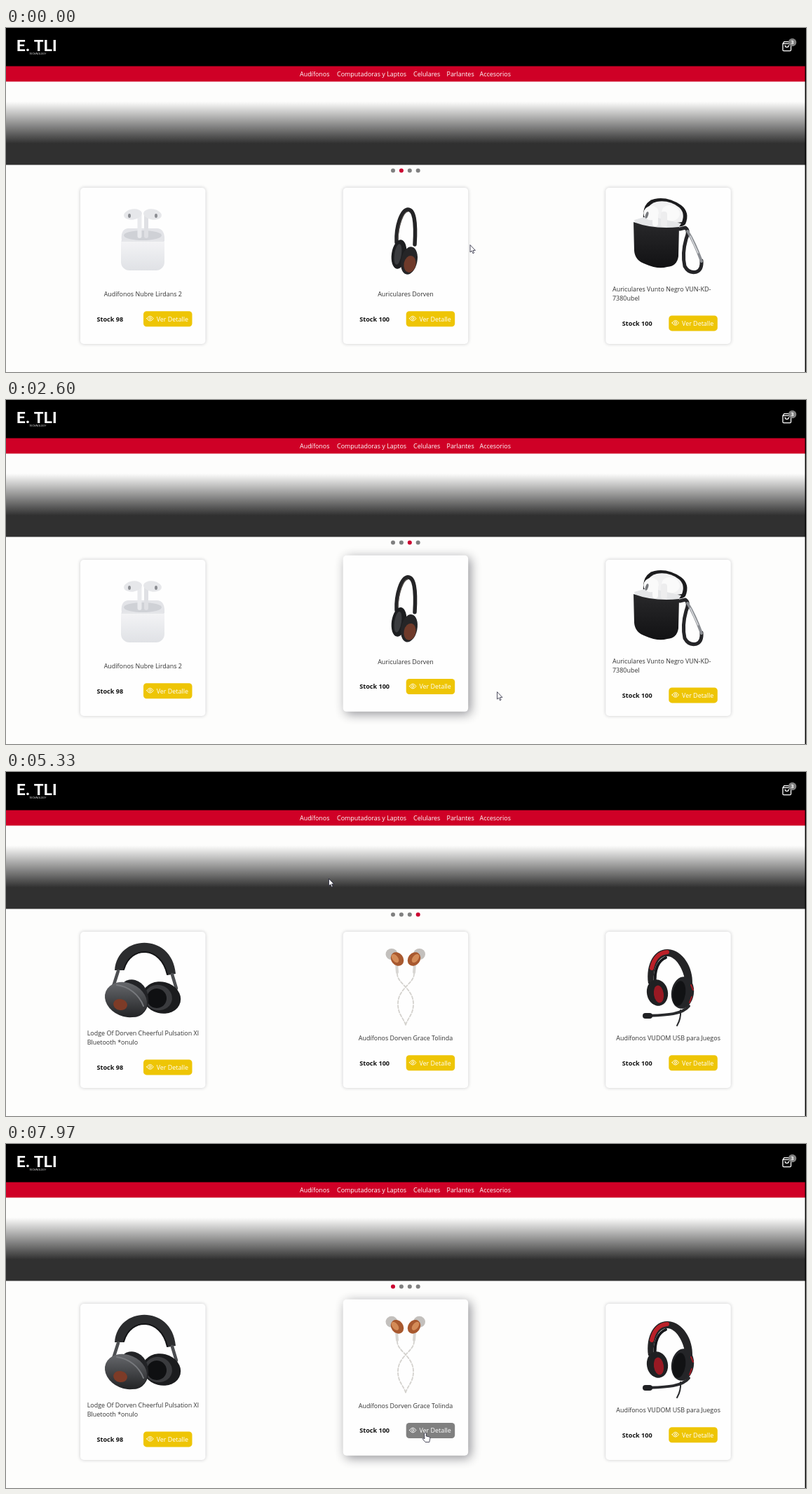
An HTML page with a canvas for the animation above (8000 ms loop, 1141 px wide and 491 px high).

```html
<!DOCTYPE html>
<html lang="es">
<head>
<meta charset="utf-8">
<title>Tienda</title>
<style>
  html, body { margin: 0; width: 100%; height: 100%; overflow: hidden; background: #fdfdfc; }
  canvas { display: block; }
</style>
</head>
<body>
<canvas id="stage" width="1141" height="491"></canvas>
<script>
const ctx = document.getElementById('stage').getContext('2d');
const LOOP = 8000, SWAP = 4800, RAMP = 200;
const SANS = '"Open Sans", "Noto Sans", sans-serif';
const RED = '#cf0026', YELLOW = '#eec505', GRAY = '#808080', PAGE = '#fdfdfc';
const CARD_X = [106, 480.7, 855.3], CARD_W = 178.5, CARD_Y = 228, CARD_H = 223, LIFT = 6.2;

const links = [
  ['Audífonos', 419, 43], ['Computadoras y Laptos', 472, 100], ['Celulares', 581, 38],
  ['Parlantes', 628.5, 38], ['Accesorios', 675.5, 45]
];
const pages = [
  [
    { lines: ['Audífonos Nubre Lirdans 2'], stock: 98, draw: budCase },
    { lines: ['Auriculares Dorven'], stock: 100, draw: slimHeadset },
    { lines: ['Auriculares Vunto Negro VUN-KD-', '7380ubel'], stock: 100, draw: blackCase }
  ],
  [
    { lines: ['Lodge Of Dorven Cheerful Pulsation Xl', 'Bluetooth *onulo'], stock: 98, draw: bigHeadset },
    { lines: ['Audífonos Dorven Grace Tolinda'], stock: 100, draw: earphones },
    { lines: ['Audífonos VUDOM USB para Juegos'], stock: 100, draw: gamingHeadset }
  ]
];
// pointer path: time, x, y
const path = [
  [0, 662, 310], [570, 662, 310], [1400, 227.5, 412], [1900, 227.5, 412],
  [2300, 598, 415], [2480, 602, 416], [2600, 700.5, 417], [2900, 972, 420],
  [3150, 972, 420], [3970, 509, 58.5], [4400, 440, 64], [5130, 440, 64],
  [5330, 460.5, 152.5], [5750, 230, 416], [5930, 230, 416], [6570, 885.5, 340],
  [6850, 978, 412], [7050, 978, 412], [7650, 590, 405], [7850, 598, 412], [8000, 598, 412]
];
// card, hover start, hover end
const hovers = [
  [0, 1150, 2020], [1, 2150, 2590], [2, 2730, 3330],
  [0, 5560, 6030], [1, 6160, 6340], [2, 6560, 7180], [1, 7380, 9000]
];

const ease = k => { k = Math.min(1, Math.max(0, k)); return k * k * (3 - 2 * k); };

function pointerAt(t) {
  const i = Math.max(1, path.findIndex(p => p[0] > t));
  const [t0, x0, y0] = path[i - 1], [t1, x1, y1] = path[i];
  const k = ease((t - t0) / (t1 - t0));
  return { x: x0 + (x1 - x0) * k, y: y0 + (y1 - y0) * k };
}

function liftOf(card, t) {
  let v = 0;
  for (const [c, from, to] of hovers)
    if (c === card) v = Math.max(v, ease((t - from) / RAMP) - ease((t - to) / RAMP));
  return v;
}

function fill(color, d) { ctx.fillStyle = color; ctx.fill(new Path2D(d)); }

function line(color, width, d) {
  ctx.strokeStyle = color;
  ctx.lineWidth = width;
  ctx.lineCap = ctx.lineJoin = 'round';
  ctx.stroke(new Path2D(d));
}

function oval(color, x, y, rx, ry, turn = 0) {
  ctx.beginPath();
  ctx.ellipse(x, y, rx, ry, turn, 0, 7);
  ctx.fillStyle = color;
  ctx.fill();
}

function box(color, x, y, w, h, r) {
  ctx.beginPath();
  ctx.roundRect(x, y, w, h, r);
  ctx.fillStyle = color;
  ctx.fill();
}

function text(str, x, y, color, font = '8.95px ' + SANS, align = 'left') {
  ctx.font = font;
  ctx.textAlign = align;
  ctx.fillStyle = color;
  ctx.fillText(str, x, y);
}

function shade(y0, y1, c0, c1) {
  const g = ctx.createLinearGradient(0, y0, 0, y1);
  g.addColorStop(0, c0);
  g.addColorStop(1, c1);
  return g;
}

// ---- products ----
function budCase() {
  fill('#e3e4e8', 'M165 304 Q163 287 174 286 H216 Q227 287 226 304Z');
  oval('#cfd1d6', 195, 296, 27, 7);
  box('#e9eaed', 187.5, 265, 6, 35, 3);
  box('#dfe0e4', 197, 265, 6, 35, 3);
  oval('#e6e7ea', 181, 266, 13, 7.5, -0.15);
  oval('#e6e7ea', 209, 266, 13, 7.5, 0.15);
  oval('#8b8d92', 176, 268, 2, 3);
  oval('#8b8d92', 214, 268, 2, 3);
  box(shade(303, 347, '#f4f4f6', '#dfe1e5'), 164, 303, 62, 43, [3, 3, 12, 12]);
  line('#cfd1d6', 0.8, 'M165 304 H225');
}

function slimHeadset() {
  line('#242426', 5.5, 'M557 306 C556 283 564 260 573 259 C582 259 585 275 583 309');
  line('#55504d', 1.2, 'M559 301 C560 280 567 263 573 262');
  oval('#1d1e20', 560.5, 323, 10.5, 21, 0.15);
  oval('#3b3c3f', 559, 323, 5, 15, 0.15);
  oval('#252527', 575, 332, 11.5, 20, 0.2);
  oval('#6f3a2a', 576, 337, 8.5, 12, 0.2);
}

function blackCase() {
  fill('#1b1b1d', 'M909 274 Q907 248 925 244 Q944 240 963 253 Q976 263 969 280 Q960 290 909 274Z');
  fill('#f1f1f2', 'M914 270 Q912 252 928 248 Q946 245 960 256 Q969 264 964 277 L920 283Z');
  fill('#e5e6e8', 'M896 274 L917 268 L963 279 L956 290 L900 284Z');
  oval('#fafafa', 920, 264, 11, 10, -0.4);
  oval('#fafafa', 948, 264, 13, 11, 0.3);
  box('#fafafa', 922, 262, 8, 21, 4);
  box('#ededee', 934, 262, 9, 22, 4);
  oval('#77797d', 914, 267, 2, 5, 0.3);
  fill(shade(275, 344, '#29292b', '#111113'),
    'M895 277 Q925 288 960 284 L959 326 Q957 340 943 341 Q930 345 912 337 Q897 332 896 318Z');
  line('#252528', 5, 'M961 287 L969 285 Q975 289 970 301 Q964 322 968 340 Q974 351 985 348 Q993 345 992 332');
  line('#8a8d92', 4, 'M972 290 Q982 306 992 333');
  line('#dfe1e4', 1.5, 'M976 297 L987 321');
}

function bigHeadset() {
  fill('#2b2c2e', 'M155 283 C159 231 237 229 242 288 L230 290 C221 248 178 247 168 283Z');
  line('#131416', 2, 'M168 282 C178 247 221 248 230 289');
  line('#4c4e51', 4.5, 'M160 284 L153 306 M237 289 L243 309');
  oval('#1b1c1e', 222, 322, 27.5, 22.5, 0.25);
  oval('#3a3b3e', 217, 322, 20, 18, 0.25);
  oval('#0f1012', 215, 323, 14, 14, 0.25);
  oval('#222326', 181, 323, 22, 27, -0.2);
  oval(shade(298, 350, '#696b6f', '#232426'), 171, 325, 31, 24, 0.4);
  line('#77797d', 2, 'M158 304 C175 306 190 318 196 334');
  oval('#7d3b27', 163, 332, 10, 8, 0.2);
}

function earphones() {
  ctx.setLineDash([4, 2.5]);
  line('#d4d2ce', 1.8, 'M558 288 C558 302 581 309 581 331 C581 346 573 351 570 361');
  line('#d4d2ce', 1.8, 'M582 288 C582 302 559 309 559 331 C559 346 567 351 570 361');
  ctx.setLineDash([]);
  oval('#c3c0bd', 550, 260, 8.5, 8);
  oval('#c3c0bd', 589.5, 260, 8.5, 8);
  line('#d8d6d3', 4, 'M557 274 L558 286 M583 274 L582 286');
  oval('#a8592f', 558, 267, 8.5, 10.5, -0.65);
  oval('#a8592f', 582, 267, 8.5, 10.5, 0.65);
  oval('#d48b57', 555, 266, 4, 7, -0.65);
  oval('#d48b57', 584, 266, 4, 7, 0.65);
}

function gamingHeadset() {
  fill('#242426', 'M916 302 C912 272 926 252 944 253 C966 254 980 280 979 302 L969 302 C967 281 955 263 943 263 C930 263 922 282 924 302Z');
  line('#bb2028', 6, 'M921 280 C924 266 932 258 943 257');
  line('#16171a', 4, 'M926 303 C924 281 931 269 941 265');
  oval('#1f2022', 929, 315, 15, 19, -0.2);
  oval('#981923', 931, 317, 7, 12.5, -0.15);
  oval('#242528', 965, 315, 16, 23, 0.15);
  oval('#111214', 960, 316, 9, 18, 0.15);
  line('#a31a24', 2, 'M977 304 L980 311 M978 321 L975 329');
  line('#28292c', 4, 'M974 334 C964 347 938 347 914 348');
  box('#202124', 908, 344, 14, 8, 4);
  line('#28292c', 2, 'M962 340 Q963 352 957 362');
}

// ---- page parts ----
function drawHeader(p) {
  ctx.fillStyle = '#000';
  ctx.fillRect(0, 0, 1141, 55);
  text('E. TLI', 15, 33, '#fff', 'bold 22.5px Roboto, sans-serif');
  text('TECHNOLOGY', 33, 38.3, '#ddd', 'italic 3.9px Roboto, sans-serif');

  ctx.save();
  ctx.translate(1106, 18.4);
  ctx.scale(0.645, 0.645);
  line('#fff', 2, 'M6 2 3 6v14a2 2 0 0 0 2 2h14a2 2 0 0 0 2-2V6l-3-4Z M3 6h18 M16 10a4 4 0 0 1-8 0');
  ctx.restore();
  oval(GRAY, 1121.5, 20.5, 5.8, 5.8);
  text('3', 1121.5, 23.3, '#fff', 'bold 7.6px ' + SANS, 'center');

  ctx.fillStyle = RED;
  ctx.fillRect(0, 54.5, 1141, 22);
  for (const link of links) text(link[0], link[1], 69.4, overLink(link, p) ? '#edbd16' : '#fff');
}

function drawBanner(t) {
  ctx.fillStyle = shade(105, 165, PAGE, '#303030');
  ctx.fillRect(0, 77, 1141, 118.4);
  const active = (Math.floor((t - 700) / 3000) + 2) % 4;
  for (let i = 0; i < 4; i++) oval(i === active ? '#cb0030' : GRAY, 552 + i * 11.9, 203.5, 3, 3);
}

const overLink = ([, x, w], p) => p.y > 55 && p.y < 77 && p.x >= x && p.x <= x + w;

function buttonOf(card, item, lift) {
  return { x: CARD_X[card] + 90, y: (item.lines.length > 1 ? 410.4 : 404.2) - LIFT * lift, w: 69.5, h: 22 };
}

const inside = (b, p) => p.x >= b.x && p.x <= b.x + b.w && p.y >= b.y && p.y <= b.y + b.h;

function drawCard(card, item, lift, p) {
  const x = CARD_X[card], dy = -LIFT * lift, b = buttonOf(card, item, lift);
  ctx.save();
  ctx.shadowColor = `rgba(20,20,30,${0.22 + 0.24 * lift})`;
  ctx.shadowBlur = 5 + 10 * lift;
  ctx.shadowOffsetX = 3.5 * lift;
  ctx.shadowOffsetY = 3.5 * lift;
  box('#fefefe', x, CARD_Y + dy, CARD_W, CARD_H, 5);
  ctx.restore();

  ctx.save();
  ctx.translate(0, dy);
  item.draw();
  const two = item.lines.length > 1;
  if (two) item.lines.forEach((s, i) => text(s, x + 9.7, 376.3 + i * 12.6, '#333'));
  else text(item.lines[0], x + 89.3, 383, '#333', undefined, 'center');
  ctx.restore();

  const mid = b.y + b.h / 2;
  text('Stock ' + item.stock, x + 23.5, mid + 3.4, '#111', 'bold 9.1px ' + SANS);
  box(inside(b, p) ? GRAY : YELLOW, b.x, b.y, b.w, b.h, 4.5);
  ctx.save();
  ctx.translate(x + 99.5, mid - 0.5);
  line('#fff', 0.9, 'M-4.7 0 Q0 -7 4.7 0 Q0 7 -4.7 0Z M1.6 0 A1.6 1.6 0 1 1 -1.6 0 A1.6 1.6 0 1 1 1.6 0');
  ctx.restore();
  text('Ver Detalle', x + 108.7, mid + 3.4, '#fff');
}

function drawPointer(p, hand) {
  const d = hand
    ? 'M-1.3 1 Q0 -.9 1.3 1 V5 L5.7 6 Q7 6.6 6.8 8.5 L5.8 13.5 H0 L-3.9 8.8 Q-3.6 7 -1.3 8.5Z'
    : 'M0 0 V10 L2.3 8 L4 11.8 L5.6 11 L4 7.4 H7Z';
  ctx.save();
  ctx.translate(p.x, p.y);
  fill('#fff', d);
  line('#25253a', 0.8, d);
  ctx.restore();
}

function render(t) {
  const p = pointerAt(t), items = pages[t < SWAP ? 0 : 1];
  const lifts = CARD_X.map((_, i) => liftOf(i, t));
  ctx.fillStyle = PAGE;
  ctx.fillRect(0, 0, 1141, 491);
  drawHeader(p);
  drawBanner(t);
  items.forEach((item, i) => drawCard(i, item, lifts[i], p));
  ctx.fillStyle = '#000';
  ctx.fillRect(1139.6, 0, 2, 491);
  const hand = links.some(l => overLink(l, p)) ||
    items.some((item, i) => inside(buttonOf(i, item, lifts[i]), p));
  drawPointer(p, hand);
}

const start = performance.now();
function tick() {
  render((performance.now() - start) % LOOP);
  requestAnimationFrame(tick);
}
tick();
</script>
</body>
</html>
```
